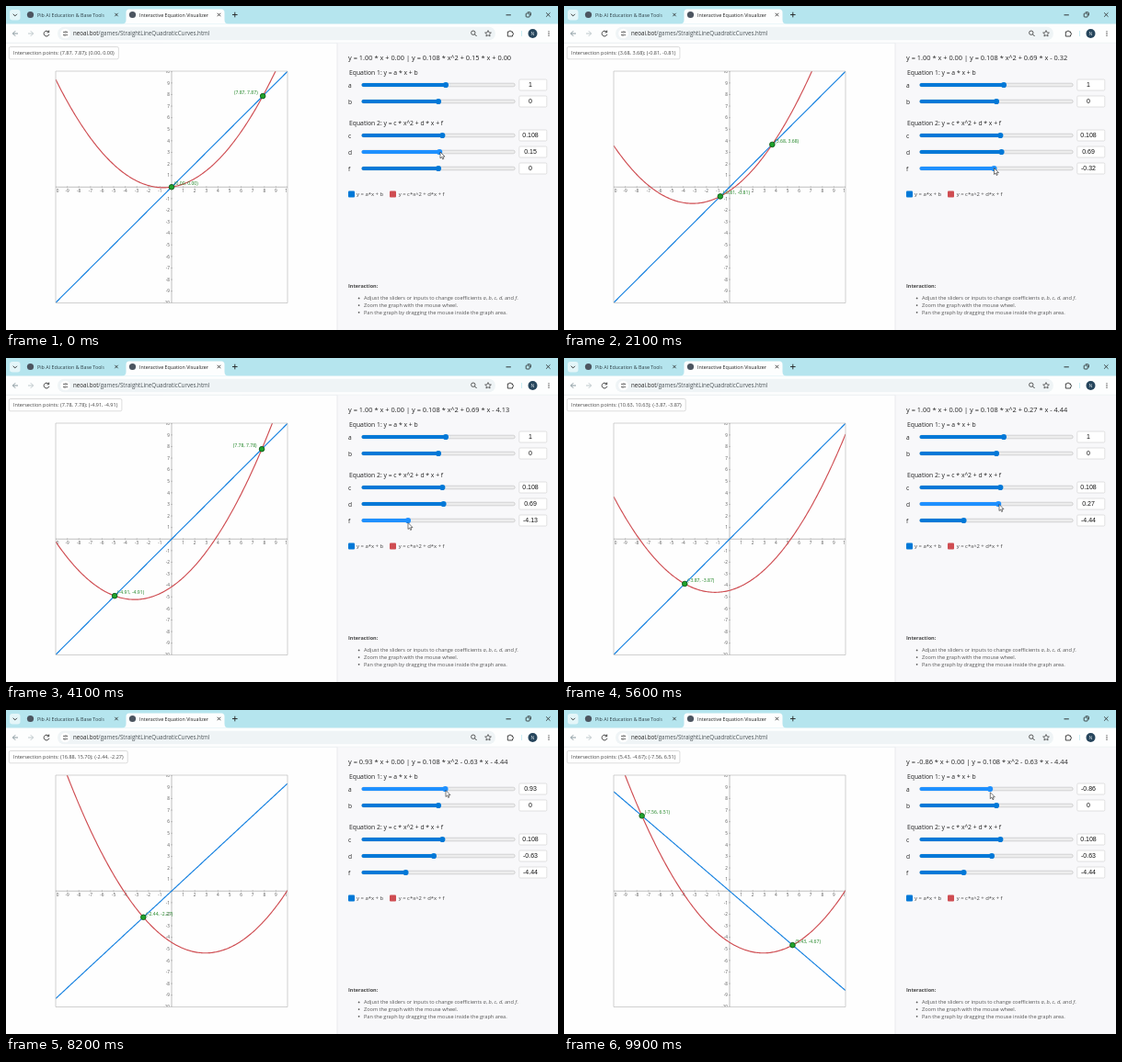
Write an HTML page with a canvas that moves like this. It is 600x353 px and loops after 10000 ms.

```html
<!DOCTYPE html>
<html lang="en">
<head>
<meta charset="utf-8">
<title>Interactive Equation Visualizer</title>
<style>
html, body { margin: 0; width: 100%; height: 100%; overflow: hidden; background: #fff; }
canvas { display: block; width: 600px; height: 353px; }
</style>
</head>
<body>
<canvas id="stage"></canvas>
<script>
const W = 600, H = 353, LOOP = 10000, STEP = 100;
const UI = '"Open Sans", "Noto Sans", sans-serif';
const ARIAL = '"Liberation Sans", Arial, sans-serif';
const BLUE = '#0078d7', HOT = '#1e90ff', RED = '#cf4d52';
const PLOT = { x: 54, y: 71, w: 252, h: 252.5, unit: 12.6 };
const OX = PLOT.x + PLOT.w / 2, OY = PLOT.y + PLOT.h / 2;

const canvas = document.getElementById('stage');
const ctx = canvas.getContext('2d');
const dpr = window.devicePixelRatio || 1;
canvas.width = W * dpr;
canvas.height = H * dpr;

// Keyframes: [time, value...]
const KEYS = {
  a: [[7800, 1], [8200, 0.93], [8600, 0.78], [9500, -0.78], [9700, -0.78], [9900, -0.86]],
  d: [[0, 0.15], [900, 0.69], [5000, 0.69], [5600, 0.27], [6300, -0.3], [6400, -0.3], [6600, -0.36], [7100, -0.63]],
  f: [[1900, 0], [2100, -0.32], [2300, -0.7], [2400, -0.7], [3000, -2.15], [3500, -3.3], [4100, -4.13], [4500, -4.44]],
  mouse: [[0, 472, 159], [900, 476, 159.5], [1000, 476, 159.5], [1800, 470, 176.5], [1900, 470, 176.5],
    [2100, 467.5, 176.5], [2300, 464.5, 177], [2400, 464.5, 177], [3000, 453, 178], [4100, 437, 179.5],
    [4500, 434.5, 179.5], [5000, 476.5, 159.5], [5600, 473, 159.5], [6400, 468, 160.3], [7100, 465.5, 160.5],
    [7700, 478.5, 87.5], [8200, 478, 87.5], [8600, 476.7, 88], [9500, 464, 89.5], [9700, 464, 89.5], [9900, 463.3, 89.7]]
};

function at(keys, t) {
  if (t <= keys[0][0]) return keys[0].slice(1);
  const i = keys.findIndex(k => k[0] > t);
  if (i < 0) return keys[keys.length - 1].slice(1);
  const p = keys[i - 1], q = keys[i], u = (t - p[0]) / (q[0] - p[0]);
  return p.slice(1).map((v, n) => v + (q[n + 1] - v) * u);
}
const value = (name, t) => Math.round(at(KEYS[name], t)[0] * 100) / 100;
const fixed = v => (Math.abs(v) < 0.005 ? 0 : v).toFixed(2);
const signed = v => (v < 0 ? '- ' : '+ ') + fixed(Math.abs(v));

function text(s, x, y, size, color = '#333', opt = {}) {
  ctx.font = `${opt.style || ''} ${opt.weight || 400} ${size}px ${opt.font || UI}`;
  ctx.textAlign = opt.align || 'left';
  ctx.textBaseline = 'alphabetic';
  ctx.fillStyle = color;
  ctx.fillText(s, x, y);
  return ctx.measureText(s).width;
}
function box(x, y, w, h, r, fill, stroke, lw = 0.6) {
  ctx.beginPath();
  ctx.roundRect(x, y, w, h, r);
  if (fill) { ctx.fillStyle = fill; ctx.fill(); }
  if (stroke) { ctx.strokeStyle = stroke; ctx.lineWidth = lw; ctx.stroke(); }
}
function disc(x, y, r, fill, stroke, lw = 0.8) {
  ctx.beginPath();
  ctx.arc(x, y, r, 0, Math.PI * 2);
  if (fill) { ctx.fillStyle = fill; ctx.fill(); }
  if (stroke) { ctx.strokeStyle = stroke; ctx.lineWidth = lw; ctx.stroke(); }
}
function path(d, color, lw = 0.9, fill) {
  const p = new Path2D(d);
  if (fill) { ctx.fillStyle = fill; ctx.fill(p); }
  ctx.strokeStyle = color;
  ctx.lineWidth = lw;
  ctx.stroke(p);
}
const cross = (x, y, r) => path(`M${x - r} ${y - r}L${x + r} ${y + r}M${x + r} ${y - r}L${x - r} ${y + r}`, '#222', 0.8);

function drawTabs() {
  ctx.fillStyle = '#b5e5ee';
  ctx.fillRect(0, 0, W, 20);
  box(4, 4, 11.5, 11.5, 3, '#e4f6f9');
  path('M7.7 8.8L9.8 10.9L11.9 8.8', '#222');

  disc(26.5, 9.5, 3.6, '#4c5560');
  const fade = ctx.createLinearGradient(104, 0, 110, 0);
  fade.addColorStop(0, '#2b3d44');
  fade.addColorStop(1, 'rgba(43,61,68,0)');
  text('Pib AI Education & Base Tools', 34, 11.7, 5.35, fade);
  cross(120, 9.5, 1.7);

  path('M126 19.5Q130.5 19.5 130.5 15V7Q130.5 3.5 134 3.5H234Q237.5 3.5 237.5 7V15Q237.5 19.5 242 19.5Z',
    'rgba(0,0,0,0)', 0.1, '#fdfefe');
  disc(137.5, 9.5, 3.6, '#4c5560');
  text('Interactive Equation Visualizer', 145, 11.7, 5.35, '#222');
  cross(231.5, 9.5, 1.7);
  path('M246 9.5H251.6M248.8 6.7V12.3', '#222');

  path('M543.5 9.8H548.8', '#222');
  box(565.2, 8, 4, 4, 0.7, null, '#222', 0.8);
  path('M566.8 6.8H569.6Q570.4 6.8 570.4 7.6V10.4', '#222', 0.8);
  cross(589.3, 9.5, 2.2);
}

function drawToolbar() {
  ctx.fillStyle = '#fdfefe';
  ctx.fillRect(0, 19.5, W, 21);
  path('M13 30H7.5M10.2 27.2L7.4 30L10.2 32.8', '#7b8d94');
  path('M24 30H29.5M26.8 27.2L29.6 30L26.8 32.8', '#b7c2c6');
  path('M46.3 28.2A2.9 2.9 0 1 0 46.9 30.8M46.7 26.6V28.8H44.5', '#333');

  box(56, 22.7, 476, 14.6, 7.3, '#eff4f6');
  disc(64.5, 30, 5.3, '#fff');
  path('M62 28.4H64M66 28.4H67.2M62 31.6H63M65.2 31.6H67.2', '#333', 0.7);
  disc(65, 28.4, 0.8, null, '#333', 0.6);
  disc(64, 31.6, 0.8, null, '#333', 0.6);
  const w = text('neoai.bot', 73, 32.2, 6.2, '#222');
  text('/games/StraightLineQuadraticCurves.html', 73 + w, 32.2, 6.2, '#4b5357');

  disc(507.8, 29.2, 2.2, null, '#333');
  path('M509.4 30.8L511.6 33', '#333');
  path('M524 26.6L525 28.9L527.4 29.1L525.6 30.7L526.1 33L524 31.8L521.9 33L522.4 30.7L520.6 29.1L523 28.9Z', '#333', 0.7);
  path('M545.3 28H547A1 1 0 0 1 549 28H550.6V29.4A1 1 0 0 1 550.6 31.4V33H545.3Z', '#333', 0.9);
  path('M560.5 27V33', '#b5e5ee', 0.7);
  disc(572.5, 30, 5, '#26455c');
  text('N', 572.5, 31.9, 5, '#e6eef2', { align: 'center' });
  for (let i = -1; i <= 1; i++) disc(590, 30 + i * 2.2, 0.65, '#333');
  path('M0 40.3H600', '#dfe6e9', 0.6);
}

function drawAxes() {
  path(`M${PLOT.x} ${OY}h${PLOT.w}M${OX} ${PLOT.y}v${PLOT.h}`, '#a5a5a5', 0.7);
  for (let i = -10; i <= 10; i++) {
    if (!i) continue;
    const x = OX + i * PLOT.unit, y = OY - i * PLOT.unit;
    path(`M${x} ${OY - 1}v2M${OX - 1} ${y}h2`, '#999', 0.5);
    text(i, x, OY + 6, 4.7, '#555', { align: 'center' });
    text(i, OX - 2, y + 1.8, 4.7, '#555', { align: 'right' });
  }
}

function drawCurve(fn, color) {
  ctx.beginPath();
  for (let x = -10; x <= 10.001; x += 0.1) ctx.lineTo(OX + x * PLOT.unit, OY - fn(x) * PLOT.unit);
  ctx.strokeStyle = color;
  ctx.lineWidth = 1.15;
  ctx.stroke();
}

function drawPoint([x, y]) {
  const px = OX + x * PLOT.unit, py = OY - y * PLOT.unit;
  disc(px, py, 2.8, '#20a32c', '#11591a', 0.9);
  const s = `(${fixed(x)}, ${fixed(y)})`;
  ctx.font = `400 5.1px ${UI}`;
  const w = ctx.measureText(s).width;
  const flip = px + 3 + w > PLOT.x + PLOT.w;
  text(s, flip ? px - 5.5 - w : px + 3, py - 2.2, 5.1, '#17801d');
}

function drawGraph(p, points) {
  const s = 'Intersection points: ' + points.map(q => `(${q.map(fixed).join(', ')})`).join('; ');
  ctx.font = `400 5.53px ${UI}`;
  box(3.3, 44.5, ctx.measureText(s).width + 9.3, 13.3, 1.5, '#fff', '#c4c4c4');
  text(s, 8, 53, 5.53, '#444');

  ctx.save();
  ctx.beginPath();
  ctx.rect(PLOT.x, PLOT.y, PLOT.w, PLOT.h);
  ctx.clip();
  drawAxes();
  drawCurve(x => p.a * x + p.b, '#1480e0');
  drawCurve(x => p.c * x * x + p.d * x + p.f, RED);
  points.forEach(drawPoint);
  ctx.restore();
  box(PLOT.x, PLOT.y, PLOT.w, PLOT.h, 0, null, '#bdbdbd', 0.7);
}

function drawSlider(name, v, scale, y, mouseY) {
  const x = 470 + v * scale, color = Math.abs(mouseY - y) < 5 ? HOT : BLUE;
  text(name, 372, y + 2.7, 6.6, '#222');
  box(386.8, y - 1.8, 166.4, 3.6, 1.8, '#ededed', '#bcbcbc', 0.6);
  box(386.5, y - 2, x - 386.5, 4, 2, color);
  disc(x, y, 3.1, color);
  box(557.8, y - 6, 30, 12, 1.2, '#fff', '#cfcfcf');
  text(String(v), 570, y + 2.4, 7, '#111', { font: ARIAL, align: 'center' });
}

function drawPanel(p, mouseY) {
  ctx.fillStyle = '#f8f8fa';
  ctx.fillRect(360, 40.6, 240, H);
  path('M360 40.6V353', '#e4e4e8', 0.7);

  const medium = { weight: 500 };
  text(`y = ${fixed(p.a)} * x ${signed(p.b)} | y = ${p.c.toFixed(3)} * x^2 ${signed(p.d)} * x ${signed(p.f)}`,
    372, 59, 7.42, '#222', medium);
  text('Equation 1: y = a * x + b', 373, 75, 6.8, '#222', medium);
  text('Equation 2: y = c * x^2 + d * x + f', 373, 130.3, 6.8, '#222', medium);

  drawSlider('a', p.a, 8, 86, mouseY);
  drawSlider('b', p.b, 8, 104, mouseY);
  drawSlider('c', p.c, 40, 141, mouseY);
  drawSlider('d', p.d, 8, 159, mouseY);
  drawSlider('f', p.f, 8, 177, mouseY);

  box(372, 201.5, 7, 7, 1, BLUE);
  text('y = a*x + b', 381, 207, 5.9, '#444');
  box(417, 201.5, 7, 7, 1, RED);
  text('y = c*x^2 + d*x + f', 426.7, 207, 5.9, '#444');

  text('Interaction:', 372, 306.5, 5.5, '#444', { weight: 700 });
  const notes = [
    'Adjust the sliders or inputs to change coefficients |a|, |b|, |c|, |d|, and |f|.',
    'Zoom the graph with the mouse wheel.',
    'Pan the graph by dragging the mouse inside the graph area.'
  ];
  notes.forEach((note, row) => {
    const y = 320.3 + row * 7.7;
    disc(383.6, y - 1.9, 0.9, '#555');
    let x = 389;
    note.split('|').forEach((part, i) => {
      x += text(part, x, y, 5.6, '#555', { style: i % 2 ? 'italic' : '' });
    });
  });
}

function drawMouse(x, y) {
  ctx.save();
  ctx.translate(x, y);
  path('M0 0V7L1.6 5.5L2.7 8L3.8 7.5L2.8 5.1H5Z', '#222', 0.6, '#fff');
  ctx.restore();
}

function roots({ a, b, c, d, f }) {
  const k = a - d, root = Math.sqrt(k * k - 4 * c * (f - b));
  return [1, -1].map(s => (k + s * root) / (2 * c)).map(x => [x, a * x + b]);
}

function draw(t) {
  const p = { a: value('a', t), b: 0, c: 0.108, d: value('d', t), f: value('f', t) };
  const [mx, my] = at(KEYS.mouse, t);
  ctx.setTransform(dpr, 0, 0, dpr, 0, 0);
  ctx.fillStyle = '#fefefe';
  ctx.fillRect(0, 0, W, H);
  drawTabs();
  drawToolbar();
  drawGraph(p, roots(p));
  drawPanel(p, my);
  drawMouse(mx, my);
}

const start = performance.now();
function tick() {
  const t = (performance.now() - start) % LOOP;
  draw(Math.floor(t / STEP) * STEP);
  requestAnimationFrame(tick);
}
tick();
</script>
</body>
</html>
```
